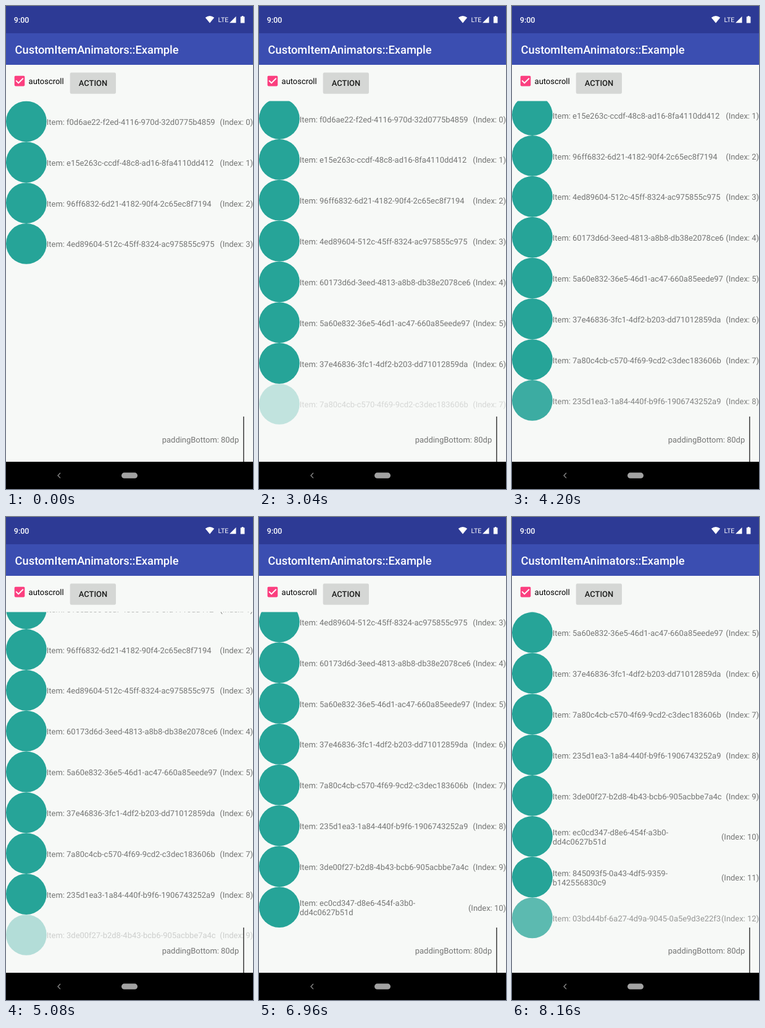
Animation, 400 px wide and 780 px high, one loop 8200 ms. Source, as an HTML page:

```html
<!DOCTYPE html>
<html lang="en">
<head>
<meta charset="utf-8">
<title>Item animators</title>
<style>
  html, body { margin: 0; height: 100%; overflow: hidden; background: #f7f9f7; }
  svg { display: block; width: 400px; height: 780px; }
  text { font: 12.94px Roboto, sans-serif; text-rendering: geometricPrecision; }
  .medium { font-weight: 500; }
  .end { text-anchor: end; }
  .grey { fill: #747574; }
  .white { fill: #fff; }
</style>
</head>
<body>
<svg viewBox="0 0 400 780">
  <clipPath id="viewport"><rect y="153.5" width="400" height="583"/></clipPath>
  <rect width="400" height="780" fill="#f7f9f7"/>

  <g clip-path="url(#viewport)"><g id="list"></g></g>

  <text class="grey end" x="377.2" y="704.8">paddingBottom: 80dp</text>
  <rect x="384" y="663" width="1.6" height="74" fill="#444"/>

  <!-- status bar -->
  <rect width="400" height="44" fill="#2d3a95"/>
  <g class="white">
    <text class="medium" x="12.8" y="26.6" style="font-size:12.5px">9:00</text>
    <path d="M322.8 18.8Q330 13.4 337.2 18.8L330 27.5Z"/>
    <text x="343.6" y="26" style="font-size:10.6px">LTE</text>
    <path d="M372.5 16.8V27.3H362Z"/>
    <path d="M381.8 16h2.6v1.2h2V27.4h-6.6V17.2h2Z"/>
  </g>

  <!-- app bar -->
  <rect y="44" width="400" height="51" fill="#3b4eb1"/>
  <text class="white medium" x="14.6" y="76.8" style="font-size:18.3px">CustomItemAnimators::Example</text>

  <!-- controls -->
  <rect x="13.7" y="112.8" width="16.6" height="16.6" rx="1.8" fill="#fb3f7f"/>
  <path class="white" transform="translate(10.9 110) scale(.926)"
        d="M10 17l-5-5 1.41-1.41L10 14.17l7.59-7.59L19 8z"/>
  <text x="36.6" y="125.8">autoscroll</text>
  <rect x="103.8" y="108.4" width="74" height="33.4" rx="2" fill="#000" opacity=".14"/>
  <rect x="103.8" y="107.6" width="74" height="33.3" rx="2" fill="#d5d7d5"/>
  <text class="medium" x="117.8" y="129.4" fill="#1c1d1c">ACTION</text>

  <!-- navigation bar -->
  <rect y="736" width="400" height="44"/>
  <path d="M88 754l-4 4.2 4 4.2" fill="none" stroke="#8c8c8c" stroke-width="1.3"/>
  <rect x="187" y="753.6" width="26" height="9.2" rx="4.6" fill="#a2a2a2"/>
</svg>
<script>
const LOOP = 8200, FADE = 250;
const TOP = 153.5, BOTTOM = 663, ROW = 65.83, INITIAL = 4;
const ids = [
  'f0d6ae22-f2ed-4116-970d-32d0775b4859',
  'e15e263c-ccdf-48c8-ad16-8fa4110dd412',
  '96ff6832-6d21-4182-90f4-2c65ec8f7194',
  '4ed89604-512c-45ff-8324-ac975855c975',
  '60173d6d-3eed-4813-a8b8-db38e2078ce6',
  '5a60e832-36e5-46d1-ac47-660a85eede97',
  '37e46836-3fc1-4df2-b203-dd71012859da',
  '7a80c4cb-c570-4f69-9cd2-c3dec183606b',
  '235d1ea3-1a84-440f-b9f6-1906743252a9',
  '3de00f27-b2d8-4b43-bcb6-905acbbe7a4c',
  'ec0cd347-d8e6-454f-a3b0-dd4c0627b51d',
  '845093f5-0a43-4df5-9359-b142556830c9',
  '03bd44bf-6a27-4d9a-9045-0a5e9d3e22f3',
];
const wrapped = [10, 11];
// moments at which each further item is added
const addedAt = [55, 992, 2002, 2977, 3977, 5001, 6001, 6977, 7977];

const list = document.getElementById('list');

function label(id, index) {
  if (!wrapped.includes(index)) return `<text x="65.8" y="38.5">Item: ${id}</text>`;
  const cut = id.lastIndexOf('-') + 1;
  return `<text x="65.8" y="31.1">Item: ${id.slice(0, cut)}</text>
    <text x="65.8" y="46.3">${id.slice(cut)}</text>`;
}

list.innerHTML = ids.map((id, i) => `
  <g class="grey" transform="translate(0 ${TOP + i * ROW})">
    <circle cx="32.9" cy="32.9" r="32.9" fill="#26a498"/>
    ${label(id, i)}
    <text class="end" x="400" y="38.5">(Index: ${i})</text>
  </g>`).join('');
const rows = [...list.children];

const scrollFor = count => Math.max(0, TOP + count * ROW - BOTTOM);

function render(now) {
  const t = now % LOOP;
  let scroll = 0;
  addedAt.forEach((start, k) => {
    const p = Math.min(1, Math.max(0, (t - start) / FADE));
    const count = INITIAL + k;
    rows[count].setAttribute('opacity', p);
    scroll += p * (scrollFor(count + 1) - scrollFor(count));
  });
  list.setAttribute('transform', `translate(0 ${-scroll})`);
}

const origin = performance.now();
function tick() {
  render(performance.now() - origin);
  requestAnimationFrame(tick);
}
tick();
</script>
</body>
</html>
```
